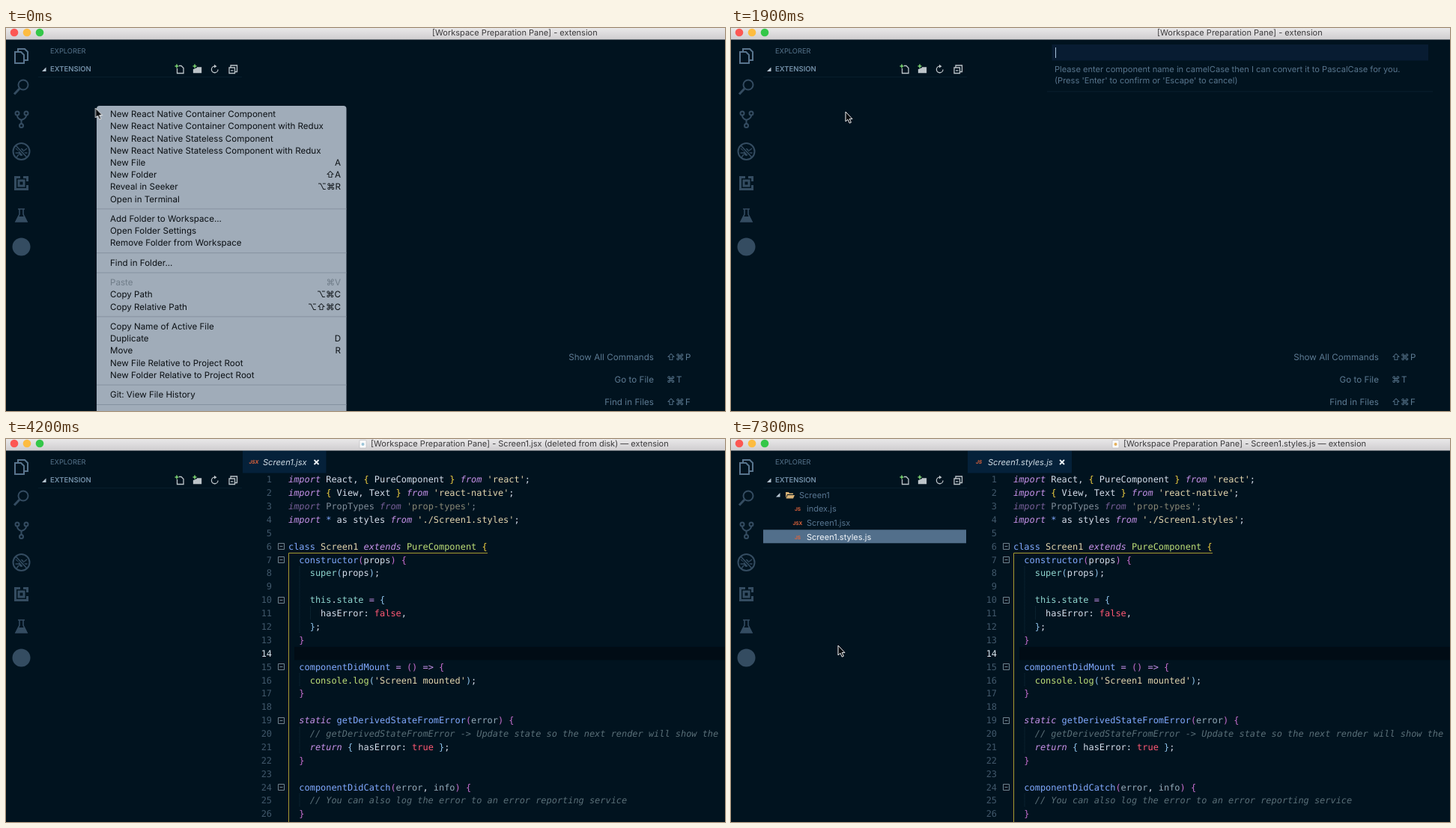
An HTML page for the animation above (7.4 s loop, 960 by 512 pixels).

```html
<!DOCTYPE html>
<html lang="en">
<head>
<meta charset="utf-8">
<title>Component generator demo</title>
<style>
  html, body { margin: 0; width: 100%; height: 100%; overflow: hidden; background: #01131f; }
  svg { position: absolute; left: 0; top: 0; display: block; }
  svg, #prompt { font-family: Inter, sans-serif; text-rendering: geometricPrecision; }
  text { white-space: pre; }
  .title { font-size: 11px; fill: #3b3a3c; }
  .side { font-size: 11px; fill: #587590; }
  .lit { fill: #f2f6fa; }
  .tab { font-size: 11.1px; font-style: italic; fill: #d2dee7; }
  .badge { font-size: 6.6px; font-weight: 700; fill: #e2643b; text-anchor: middle; }
  .menu { font-size: 11.6px; fill: #0b1014; }
  .hint { font-size: 11.6px; fill: #5d7b93; }
  .note { font-size: 11.1px; fill: #58758d; }
  .code, .num { font: 11.93px "DejaVu Sans Mono", monospace; fill: #d6deeb; }
  .num { fill: #41586b; text-anchor: end; }
  .end { text-anchor: end; }
  .line { fill: none; stroke-width: 1; }
  .icon { fill: none; stroke: #344c61; stroke-width: 2; }
  #prompt div { position: absolute; left: 432.5px; top: 24px; height: 17px; font-size: 11px;
    line-height: 17px; color: #d6deeb; white-space: pre; }
  #prompt i { display: inline-block; width: 1px; height: 14px; background: #a9c4dc; vertical-align: middle; }
</style>
</head>
<body>
<svg id="stage" width="960" height="512" viewBox="0 0 960 512"></svg>
<div id="prompt"></div>
<svg width="960" height="512" viewBox="0 0 960 512">
  <g id="pointer">
    <path data-on="0-2250 4900-5350 6750-7400" fill="#080b0e" stroke="#f4f4f4" stroke-linejoin="round"
      d="M0 0V13L3 10.3L5.2 15.2L7.4 14.2L5.2 9.6H9Z"/>
    <path data-on="5350-6750" fill="#f4f4f4" stroke="#11181e" stroke-width=".7" stroke-linejoin="round"
      d="M-1.3 1Q0-.6 1.2 1V5L5.8 6Q7.2 6.6 6.8 9L6 13H-1L-4.4 8.6Q-4.6 7-3 7.2L-1.3 8.6Z"/>
  </g>
</svg>
<script>
const LOOP = 7400;
const OPENED = 3900, EXPANDED = 5650, HOVERED = 6100, PICKED = 6700;
const stage = document.getElementById('stage');

const text = (x, y, s, cls, extra = '') => `<text x="${x}" y="${y}" class="${cls}" ${extra}>${s}</text>`;
const rect = (x, y, w, h, fill, extra = '') =>
  `<rect x="${x}" y="${y}" width="${w}" height="${h}" fill="${fill}" ${extra}/>`;
const path = (d, extra = '') => `<path d="${d}" ${extra}/>`;
const circle = (x, y, r, extra = '') => `<circle cx="${x}" cy="${y}" r="${r}" ${extra}/>`;
const during = (spans, body) => `<g data-on="${spans}">${body}</g>`;

// Window frame
const HOST = '[Workspace Preparation Pane]';
function titleBar() {
  const docIcon = (x, dot) => rect(x, 1.5, 9, 10.5, '#fafafa', 'rx="1" stroke="#b9b9bd" stroke-width=".6"')
    + circle(x + 4.5, 7, 2, `fill="${dot}"`);
  const light = (x, color) => circle(x, 6, 5.3, `fill="${color}"`);
  return rect(0, 0, 960, 15.5, 'url(#chrome)')
    + light(11, '#fc5753') + light(28, '#fdbc40') + light(45, '#34c749')
    + during(`0-${OPENED}`, text(569, 10.3, `${HOST} - extension`, 'title'))
    + during(`${OPENED}-${PICKED}`, docIcon(472, '#9bc4d8')
      + text(487, 10.3, `${HOST} - Screen1.jsx (deleted from disk) — extension`, 'title'))
    + during(`${PICKED}-${LOOP}`, docIcon(509, '#e6b15c')
      + text(524, 10.3, `${HOST} - Screen1.styles.js — extension`, 'title'));
}

function activityBar() {
  return '<g class="icon">'
    + path('M16 31V28H25L29 32V43H25M12 32H20L24 36V47H12Z', 'stroke="#58748d"')
    + circle(23, 76, 6.5) + path('M18 81L11 88.5', 'stroke-width="3"')
    + circle(15, 114, 2.5) + circle(27, 114, 2.5) + circle(20.5, 130.5, 2.5)
    + path('M15 117Q15 121 20.5 123Q27 121 27 117M20.5 123V128')
    + '<ellipse cx="20.5" cy="166" rx="3.5" ry="5" fill="#344c61" stroke="none"/>'
    + path('M13 161L17 164M28 161L24 164M12.5 167H28.5M14 173L17 169M27 173L24 169', 'stroke-width="1.4"')
    + path('M13 157L28 173', 'stroke="#01131f" stroke-width="4"') + path('M13 157L28 173', 'stroke-width="1.6"')
    + circle(20.5, 165, 11)
    + path('M19 199.5H12.5V215.5H28.5V210M23 199.5H28.5V205M17 204H24V211H17Z', 'stroke-width="3"')
    + path('M16 242H25M18 242V249L13 259H28L23 249V242', 'stroke-width="1.6"')
    + path('M16.5 253H24.5L27 258H14Z', 'fill="#344c61"')
    + '</g>' + circle(20.5, 292.5, 12, 'fill="#344c61"');
}

function sidebar() {
  const plus = x => path(`M${x - 2.5} 51H${x + 2.5}M${x} 48.5V53.5`, 'class="line" style="stroke:#79cf70;stroke-width:1.6"');
  return text(59, 34.4, 'EXPLORER', '', 'font-size="9.3" fill="#58758d"')
    + path('M48 58H53.5V52.5Z', 'fill="#b7c5d1"')
    + text(59, 58.3, 'EXTENSION', '', 'font-size="9.5" font-weight="600" fill="#7390a8"')
    + path('M43 65.5H315', 'class="line" stroke="#071d2c"')
    + '<g fill="none" stroke="#bdc4c9" stroke-width="1.3">'
    + path('M231 50.5H234L237 53.5V60.5H228.5V54') + path('M250.5 55V59.5H260.5V53H255', 'fill="#bdc4c9"')
    + path('M278 51.2A4.3 4.3 0 1 0 283 55.4') + path('M278 48.8L281.5 51.2L278 53.6Z', 'fill="#bdc4c9" stroke="none"')
    + path('M300 53V50H308.5V58.5H306M298 53H305.5V60.5H298ZM300 56.8H303.5')
    + '</g>' + plus(228) + plus(252);
}

function fileTree() {
  const badge = (y, s) => text(89, y - 1.3, s, 'badge');
  const bar = y => rect(43, y, 271, 18, '#526f8b');
  const folder = text(91, 78.5, 'Screen1', 'side')
    + path('M73 71H77L78 72.5H83V74H75L73 79ZM75.5 75H85L83 79.5H73.5Z', 'fill="#d6b075"');
  const name = 'Screen1.styles.js';
  return during(`${EXPANDED}-${PICKED}`, bar(65.2))
    + during(`${PICKED}-${LOOP}`, bar(121.3))
    + during(`4700-${LOOP}`, folder)
    + during(`4700-${EXPANDED}`, path('M61 71.5L65 75L61 78.5Z', 'fill="#b7c5d1"'))
    + during(`${EXPANDED}-${PICKED}`, text(91, 78.5, 'Screen1', 'side lit'))
    + during(`${EXPANDED}-${LOOP}`, path('M60 77.5H65.5V72Z', 'fill="#b7c5d1"')
      + badge(97.3, 'JS') + text(101, 97.3, 'index.js', 'side')
      + badge(116, 'JSX') + text(101, 116, 'Screen1.jsx', 'side')
      + badge(134.8, 'JS'))
    + during(`${EXPANDED}-${HOVERED}`, text(101, 134.8, name, 'side'))
    + during(`${HOVERED}-${PICKED}`, path('M43 121.5H314V139H43Z', 'class="line" stroke="#12304a" stroke-dasharray="2 2"'))
    + during(`${HOVERED}-${LOOP}`, text(101, 134.8, name, 'side lit'));
}

// Context menu
function contextMenu() {
  const groups = [
    ['New React Native Container Component', 'New React Native Container Component with Redux',
      'New React Native Stateless Component', 'New React Native Stateless Component with Redux',
      'New File|A', 'New Folder|⇧A', 'Reveal in Seeker|⌥⌘R', 'Open in Terminal'],
    ['Add Folder to Workspace...', 'Open Folder Settings', 'Remove Folder from Workspace'],
    ['Find in Folder...'],
    ['Paste|⌘V', 'Copy Path|⌥⌘C', 'Copy Relative Path|⌥⇧⌘C'],
    ['Copy Name of Active File', 'Duplicate|D', 'Move|R', 'New File Relative to Project Root',
      'New Folder Relative to Project Root'],
    ['Git: View File History'],
  ];
  let y = 119.2, body = rect(121, 104, 333.5, 430, '#a0acb9', 'rx="4"');
  for (const group of groups) {
    for (const item of group) {
      const [label, keys = ''] = item.split('|');
      const dim = label === 'Paste' ? 'style="fill:#707d89"' : '';
      body += text(139, y, label, 'menu', dim) + text(447, y, keys, 'menu end', dim);
      y += 16.2;
    }
    body += path(`M121 ${y - 6.9}H454.5`, 'class="line" stroke="#8592a0"');
    y += 10.2;
  }
  body += during('350-1300', rect(121, 107, 333.5, 17, '#0759d6')
    + text(139, 119.2, groups[0][0], 'menu lit', 'style="fill:#fff"'));
  return `<g id="menu">${body}</g>`;
}

function hints() {
  const row = (y, label, keys, xs) => text(865, y, label, 'hint end', 'letter-spacing=".05"')
    + text(xs, y, keys, 'hint');
  return during(`0-${OPENED}`, row(444.3, 'Show All Commands', '⇧⌘P', '882 894 907')
    + row(474.3, 'Go to File', '⌘T', '882 895')
    + row(504.3, 'Find in Files', '⇧⌘F', '882 894 907'));
}

function promptBox() {
  return during('1500-3600', rect(422, 15.5, 515, 70, '#01131f')
    + path('M422 85H937', 'class="line" stroke="#0b2030"')
    + rect(428.5, 22, 502.5, 21.5, '#081c32')
    + text(432, 59.2, 'Please enter component name in camelCase then I can convert it to PascalCase for you.', 'note')
    + text(432, 74.4, "(Press 'Enter' to confirm or 'Escape' to cancel)", 'note'));
}

// Editor. Each segment starts with its colour key.
const COLORS = { i: '#c792ea', k: '#c792ea', w: '#d6deeb', y: '#f0d040', s: '#e3d5ae', f: '#82aaff',
  g: '#bfdf78', r: '#ff5874', c: '#5a6f78', m: '#c86fd0', b: '#8fc4ec', t: '#8fd6cf', e: '#93a9b8' };
const SOURCE = `iimport |wReact, |y{ |wPureComponent |y} |ifrom |s'react'|w;
iimport |y{ |wView, Text |y} |ifrom |s'react-native'|w;
iimport |wPropTypes |ifrom |s'prop-types'|w;
iimport |f* |was styles |ifrom |s'./Screen1.styles'|w;

fclass |sScreen1 |iextends |gPureComponent |y{
f  constructor|m(|wprops|m) {
t    super|b(|wprops|b)|w;

t    this|w.|tstate |k= |b{
w      hasError: |rfalse|w,
b    }|w;
m  }

f  componentDidMount |k= |m() |k=> |m{
g    console.log|b(|s'Screen1 mounted'|b)|w;
m  }

i  static |fgetDerivedStateFromError|m(|eerror|m) {
c    // getDerivedStateFromError -> Update state so the next render will show the
i    return |b{ |whasError: |rtrue |b}|w;
m  }

f  componentDidCatch|m(|eerror|w, |einfo|m) {
c    // You can also log the error to an error reporting service
m  }`.split('\n');

function editor() {
  const PITCH = 17.88, lineY = n => 54 + (n - 1) * PITCH;
  const segment = s => `<tspan fill="${COLORS[s[0]]}"${'ic'.includes(s[0]) ? ' font-style="italic"' : ''}>${s.slice(1)}</tspan>`;
  const guide = (x, from, to) => path(`M${x} ${lineY(from) - 9}V${lineY(to) + 9}`, 'class="line" stroke="#15303f" stroke-dasharray="1 1"');
  const tab = (right, badge, name) => rect(316, 15.5, right - 316, 30, '#05213a')
    + text(331, 33.2, badge, 'badge', 'font-style="italic"') + text(343, 35, name, 'tab')
    + path(`M${right - 16} 28L${right - 10} 34M${right - 10} 28L${right - 16} 34`, 'stroke="#edf3f8" stroke-width="1.8"');
  let body = rect(385, lineY(14) - 8.5, 575, 17.5, '#010c15')
    + guide(392, 8, 12) + guide(406.5, 11, 11) + guide(392, 16, 16) + guide(392, 20, 21) + guide(392, 25, 25);
  SOURCE.forEach((line, i) => {
    const n = i + 1, y = lineY(n) + 4.3;
    body += text(355, y, n, 'num', n === 14 ? 'style="fill:#dce6ee"' : '');
    if (line) body += text(377, y, line.split('|').map(segment).join(''), 'code', n === 3 ? 'opacity=".6"' : '');
  });
  for (const n of [6, 7, 10, 15, 19, 24]) {
    const y = Math.round(lineY(n)) + .5;
    body += path(`M363.5 ${y - 4}H371.5V${y + 4}H363.5ZM365.5 ${y}H369.5`, 'class="line" stroke="#72838f"');
  }
  body += path('M643 152.5H377.5V512', 'class="line" stroke="#a89b32"');
  return during(`${OPENED}-${LOOP}`, body
    + during(`${OPENED}-${PICKED}`, tab(427.5, 'JSX', 'Screen1.jsx'))
    + during(`${PICKED}-${LOOP}`, tab(455, 'JS', 'Screen1.styles.js')));
}

stage.innerHTML = `<defs><linearGradient id="chrome" x2="0" y2="1">
  <stop stop-color="#e9e8e9"/><stop offset="1" stop-color="#cfcdcf"/></linearGradient></defs>`
  + rect(0, 0, 960, 512, '#01131f') + activityBar() + sidebar() + fileTree()
  + hints() + editor() + promptBox() + contextMenu() + titleBar();

// One line per typed state, with the caret after it
const typed = 'Screen1', PROMPTED = 1500, ENTERED = 3600;
const keyTimes = [PROMPTED, 2275, 2400, 2525, 2650, 2775, 2900, 3150, ENTERED];
document.getElementById('prompt').innerHTML = keyTimes.slice(0, -1).map((from, n) =>
  `<div data-on="${from}-${keyTimes[n + 1]}">${typed.slice(0, n)}<i></i></div>`).join('');

// Motion
const play = (el, frames) => el.animate(frames, { duration: LOOP, iterations: Infinity });

for (const el of document.querySelectorAll('[data-on]')) {
  const key = (time, opacity) => ({ offset: time / LOOP, opacity, easing: 'step-end' });
  const spans = el.dataset.on.split(' ').map(span => span.split('-').map(Number));
  const frames = spans[0][0] > 0 ? [key(0, 0)] : [];
  for (const [from, to] of spans) {
    frames.push(key(from, 1));
    if (to < LOOP) frames.push(key(to, 0));
  }
  frames.push(key(LOOP, frames[frames.length - 1].opacity));
  play(el, frames);
}

play(document.getElementById('menu'), [[0, 1], [1050, 1], [1280, 0], [LOOP, 0]]
  .map(([time, opacity]) => ({ offset: time / LOOP, opacity })));

play(document.getElementById('pointer'), [
  [0, 119.5, 107], [150, 119.5, 107], [600, 153, 112], [2250, 153, 112],
  [4900, 170, 190], [5450, 112, 74], [5750, 112, 74], [6250, 157, 133],
  [6700, 157, 133], [7150, 143, 276], [LOOP, 143, 276],
].map(([time, x, y]) => ({ offset: time / LOOP, transform: `translate(${x}px, ${y}px)`, easing: 'ease-in-out' })));
</script>
</body>
</html>
```
